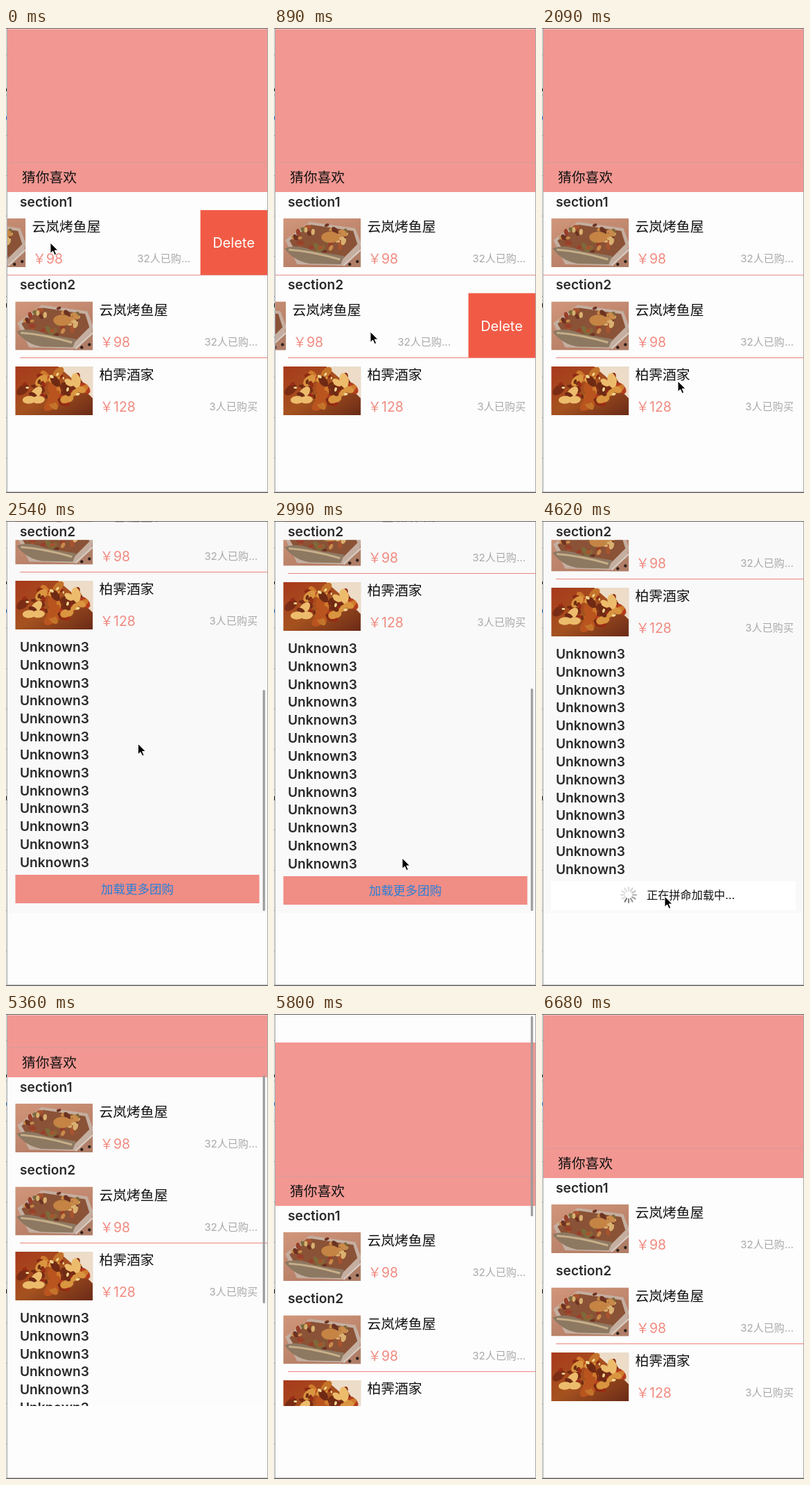
An HTML page for the animation above (6780 ms loop, 378x669 px).

```html
<!DOCTYPE html>
<html lang="zh-CN">
<head>
<meta charset="utf-8">
<title>Swipe and load list</title>
<style>
  html, body { margin: 0; width: 100%; height: 100%; overflow: hidden; background: #fdfdfd; }
  svg { display: block; width: 100%; height: 100%; }
  text { font-family: Inter, "Noto Sans CJK SC", "Noto Sans CJK", sans-serif; white-space: pre; }
  .title { font-size: 19.8px; fill: #111; }
  .price { font-size: 19.5px; fill: #f18b81; }
  .sold { font-size: 15.1px; fill: #a9a9a9; text-anchor: end; }
  .head { font-size: 19.2px; font-weight: 600; fill: #2a2a2c; }
  .delete { font-size: 20px; fill: #fff; text-anchor: middle; }
  .more { font-size: 17.5px; fill: #2b7fd6; text-anchor: middle; }
  .wait { font-size: 16.2px; fill: #111; }
</style>
</head>
<body>
<svg viewBox="0 0 378 669" preserveAspectRatio="none">
  <defs>
    <clipPath id="tableClip"><rect x="2" y="1.5" width="375.5" height="562.5"/></clipPath>
    <clipPath id="photoClip"><rect width="112" height="70"/></clipPath>
    <linearGradient id="wood" x2="0.6" y2="1">
      <stop stop-color="#d0967b"/><stop offset="1" stop-color="#b37c64"/>
    </linearGradient>
    <linearGradient id="sauce" x2="1" y2="1">
      <stop stop-color="#a8391c"/><stop offset="0.5" stop-color="#a5521f"/><stop offset="1" stop-color="#6a2a17"/>
    </linearGradient>
    <g id="fish" clip-path="url(#photoClip)"></g>
    <g id="stew" clip-path="url(#photoClip)"></g>
  </defs>

  <rect width="378" height="669" fill="#fdfdfd"/>
  <g clip-path="url(#tableClip)">
    <rect id="tint" x="2" y="1.5" width="376" height="562.5"/>
    <g id="content">
      <rect x="2" y="1" width="376" height="235" fill="#f29792"/>
      <path d="M2 193.5H378" stroke="#d69c99"/>
      <text class="title" x="23" y="221.5">猜你喜欢</text>
      <g id="rows"></g>
      <path d="M20 474.5H378" stroke="#ee857c"/>
      <g id="unknowns"></g>
      <g id="button">
        <rect x="13.5" y="910" width="352" height="41" fill="#f08d85"/>
        <text class="more" x="189.5" y="937">加载更多团购</text>
      </g>
      <g id="loading">
        <rect x="13" y="909" width="353" height="42" fill="#fff"/>
        <g id="spinner" transform="translate(125 929)"></g>
        <text class="wait" x="151" y="935">正在拼命加载中...</text>
      </g>
    </g>
    <g id="heads"></g>
    <path id="rule" d="M2 355.5H378" stroke="#e0908a"/>
    <rect id="bar" x="370.5" width="3.2" rx="1.6" fill="#9b9b9b"/>
  </g>

  <rect width="1.5" height="669" fill="#dfe3e8"/>
  <path d="M.75 38V669" stroke="#8e939a" stroke-width="1.5" stroke-dasharray="1 57"/>
  <path d="M0 87h1.5v4H0M0 396h1.5v6H0" fill="#222"/>
  <rect y="127" width="1.5" height="5" fill="#2476d2"/>
  <path d="M1.5 0V669M377.5 0V669M0 667.5H378" stroke="#a8a8a8" fill="none"/>
  <path d="M0 .5H378M0 668.5H378" stroke="#626266"/>

  <path id="cursor" d="M0 0V15.3L3.6 12 6.2 17.6 8.7 16.5 6.2 11H11Z" fill="#000" stroke="#fff"/>
</svg>

<script>
const LOOP = 6780;
const STEP = 148.4; // the picture advances in even steps
const LEAD = 6;
const MAX_SCROLL = 391;
const $ = id => document.getElementById(id);
const repeat = (count, make) => Array.from({ length: count }, (_, i) => make(i)).join('');

const clamp = (value, low, high) => Math.max(low, Math.min(high, value));
const linear = u => u;
const smooth = u => u * u * (3 - 2 * u);
const outQuad = u => 1 - (1 - u) ** 2;
const outCubic = u => 1 - (1 - u) ** 3;

// Each move eases the value toward `to` between two ticks.
const move = (start, end, to, ease = smooth) => ({ start, end, to, ease });
const follow = (initial, moves) => tick => moves.reduce((value, { start, end, to, ease }) =>
  value + (to - value) * ease(clamp((tick - start) / (end - start), 0, 1)), initial);

const swipes = [
  follow(97, [move(1, 4, 0)]),
  follow(0, [move(2, 6, 108), move(6, 8, 97), move(9, 12, 0)])
];
const scrollAt = follow(0, [
  move(14, 18, 428, outQuad), move(18, 23, MAX_SCROLL, outCubic),
  move(33, 38.6, -53), move(38.6, 43, 0, outCubic)
]);
const cursorX = follow(64, [move(1, 3, 240), move(3, 6, 139), move(6, 14, 196), move(14, 20, 185), move(20, 23, 177)]);
const cursorY = follow(309, [move(1, 3, 437), move(6, 14, 508), move(14, 16, 290), move(16, 20, 485),
  move(20, 23, 540), move(33, 36, 700, linear)]);

function seeded(seed) {
  return () => (seed = seed * 16807 % 2147483647) / 2147483647;
}

function specks(count, seed, size, colors) {
  const random = seeded(seed);
  return repeat(count, i => {
    const angle = random() * Math.PI * 2, reach = Math.sqrt(random());
    const x = 56 + Math.cos(angle) * reach * 46, y = 33 + Math.sin(angle) * reach * 25;
    const r = size * (0.6 + random() * 0.7);
    return `<ellipse rx="${r}" ry="${r * 0.6}" fill="${colors[i % colors.length]}"
      transform="translate(${x} ${y}) rotate(${random() * 180})"/>`;
  });
}

$('fish').innerHTML = `
  <rect width="112" height="70" fill="url(#wood)"/>
  <path d="M3 31L38 5 104 14 112 35 109 52 86 68 20 66Z" fill="#c4aea0"/>
  <path d="M9 32L40 9 101 18 107 37 84 60 24 57Z" fill="#8a5236"/>
  ${specks(44, 71, 5, ['#a8532f', '#c98a4a', '#6d3322', '#d9b070', '#98402a', '#7d6a3a'])}
  <ellipse cx="68" cy="27" rx="13" ry="8" fill="#c58444"/>
  <path d="M2 43Q20 36 45 47L88 54 83 66 38 65Q15 61 2 43Z" fill="#8d7862"/>
  <path d="M8 45Q40 47 82 59" stroke="#c6ae88" stroke-width="3" fill="none"/>
  <path d="M86 68L112 47V70H84Z" fill="#b07e67"/>
  <path d="M87 68L112 45" stroke="#d8cec4" stroke-width="2"/>
  <circle cx="96" cy="66" r="2.2" fill="#30211d"/><circle cx="107" cy="62" r="2.2" fill="#30211d"/>`;

$('stew').innerHTML = `
  <rect width="112" height="70" fill="url(#sauce)"/>
  <path d="M62 0H112V46L92 26Z" fill="#ecdcc8"/>
  ${specks(24, 19, 8, ['#b53c1d', '#7a2c15', '#cf7a2c', '#8e2a14'])}
  ${specks(24, 203, 9, ['#d9953f', '#c4732a', '#ecbc6c', '#b9541f', '#6f2a14'])}
  ${specks(18, 47, 3.2, ['#f6d792', '#9a2c16', '#6f2c12'])}`;

const items = [
  { top: 262, photo: 'fish', name: '云岚烤鱼屋', price: 98, sold: '32人已购…' },
  { top: 381.5, photo: 'fish', name: '云岚烤鱼屋', price: 98, sold: '32人已购…' },
  { top: 475, photo: 'stew', name: '柏霁酒家', price: 128, sold: '3人已购买' }
];
$('rows').innerHTML = items.map(({ top, photo, name, price, sold }, i) => `
  <g transform="translate(0 ${top})">
    <g id="cell${i}">
      <use href="#${photo}" x="13.3" y="12"/>
      <text class="title" x="134.5" y="31.3">${name}</text>
      <text class="price" x="135.5" y="77">￥${price}</text>
      <text class="sold" x="363" y="75">${sold}</text>
    </g>
    <g id="delete${i}">
      <rect width="98" height="93" fill="#f15b45"/>
      <text class="delete" x="48" y="54">Delete</text>
    </g>
  </g>`).join('');

$('unknowns').innerHTML = repeat(13, i => `<text class="head" x="20" y="${589 + i * 25.83}">Unknown3</text>`);

const heads = [{ top: 236, end: 355 }, { top: 355, end: 569 }];
$('heads').innerHTML = repeat(heads.length, i => `
  <g id="head${i}">
    <rect id="headTint${i}" x="2" width="376" height="26"/>
    <text class="head" x="20" y="20.6">section${i + 1}</text>
  </g>`);

$('spinner').innerHTML = repeat(12, i =>
  `<path d="M0-6V-11" stroke="#777" stroke-width="2.2" stroke-linecap="round" transform="rotate(${i * 30})"/>`);
const spokes = [...$('spinner').children];

const place = (id, x, y) => $(id).setAttribute('transform', `translate(${x} ${y})`);
const show = (id, visible) => $(id).setAttribute('display', visible ? 'inline' : 'none');

function drawSwipes(tick) {
  swipes.forEach((shiftAt, i) => {
    const shift = shiftAt(tick);
    place('cell' + i, -shift, 0);
    place('delete' + i, 377.5 - Math.min(shift, 97), 0);
    show('delete' + i, shift > 0);
  });
}

function drawScroll(tick) {
  const offset = Math.round(scrollAt(tick));
  const inside = clamp(offset, 0, MAX_SCROLL);
  const shade = 253 - 4 * inside / MAX_SCROLL;
  const tint = `rgb(${shade},${shade},${shade})`;
  $('tint').setAttribute('fill', tint);
  place('content', 0, -offset);

  heads.forEach(({ top, end }, i) => {
    place('head' + i, 0, Math.min(Math.max(top - offset, 1.2), end - offset - 26));
    $('headTint' + i).setAttribute('fill', tint);
  });

  // The bar shrinks against the edge while the list is pulled past its end.
  const excess = Math.abs(offset - inside);
  $('bar').setAttribute('y', 3 + inside / MAX_SCROLL * 230 + Math.max(0, offset - MAX_SCROLL));
  $('bar').setAttribute('height', 328 - excess);
  show('bar', offset !== 0 && offset !== MAX_SCROLL);
  show('rule', tick < 15);
}

function drawLoading(tick) {
  const busy = tick >= 24 && tick < 32;
  show('button', !busy);
  show('loading', busy);
  const lead = Math.floor((tick - 25) * STEP * 12 / 1000) + 9;
  spokes.forEach((spoke, i) => {
    const age = (lead - i + 48) % 12;
    spoke.setAttribute('opacity', Math.max(0.25, 1 - age * 0.11));
  });
}

function frame() {
  const tick = Math.floor((performance.now() % LOOP + LEAD) / STEP);
  drawSwipes(tick);
  drawScroll(tick);
  drawLoading(tick);
  place('cursor', cursorX(tick), cursorY(tick));
  requestAnimationFrame(frame);
}
show('delete2', false);
frame();
</script>
</body>
</html>
```
